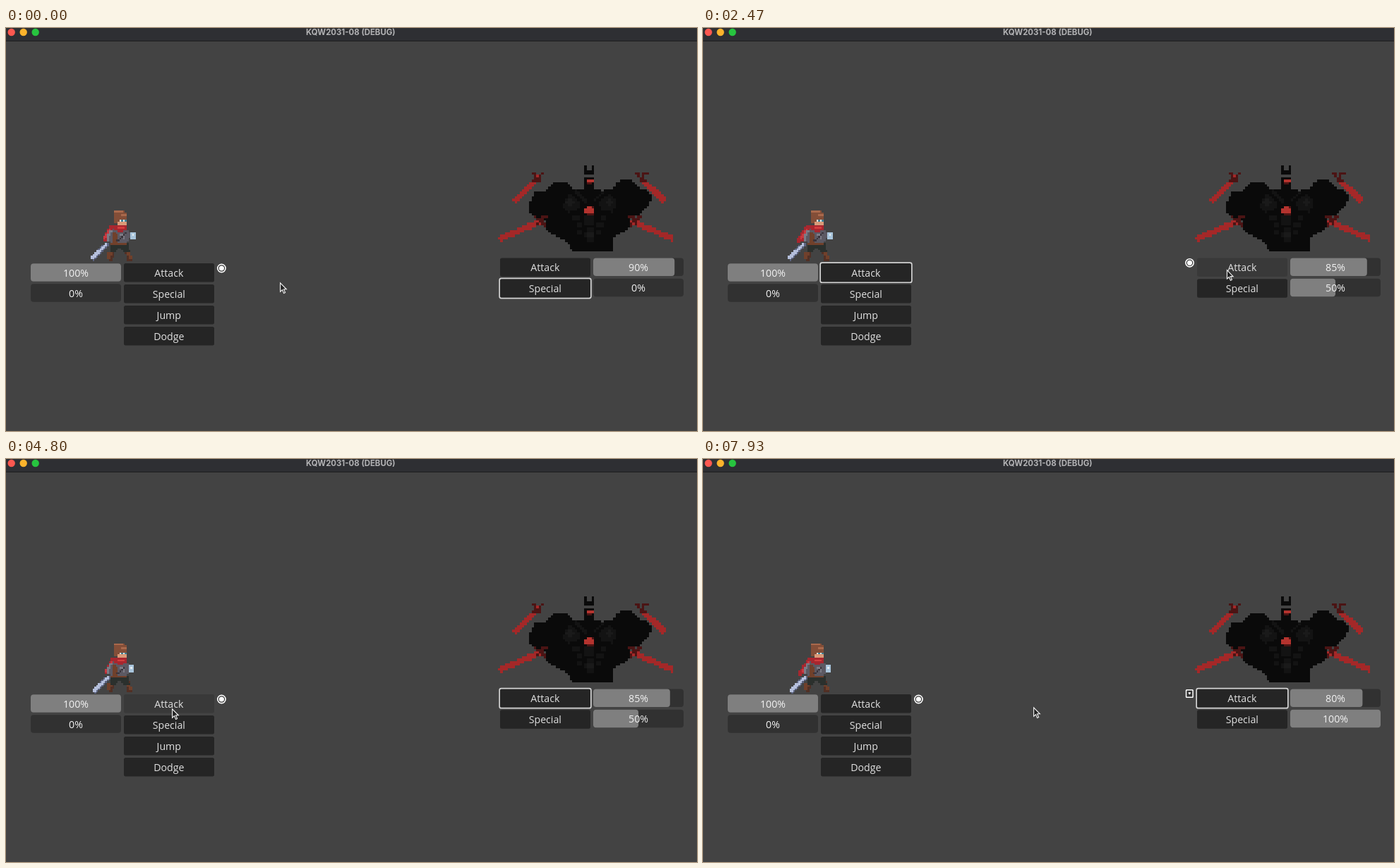
An HTML page with a canvas that plays this animation: 979 px wide and 572 px high, repeating every 8000 ms.

```html
<!DOCTYPE html>
<html lang="en">
<head>
<meta charset="utf-8">
<title>Battle prototype</title>
<style>
  html, body { margin: 0; width: 100%; height: 100%; overflow: hidden; background: #434343; }
  canvas { display: block; }
</style>
</head>
<body>
<canvas id="stage" width="979" height="572"></canvas>
<script>
const ctx = document.getElementById('stage').getContext('2d');
const LOOP = 8000;

// ---------- pixel sprites: vector shapes sampled on a coarse grid ----------
// shape: [colour, path, stroke width (0 = filled)]
function makeSprite(cell, x, y, cols, rows, shapes) {
  const image = document.createElement('canvas');
  image.width = cols;
  image.height = rows;
  const g = image.getContext('2d');
  for (const [colour, path, width] of shapes) {
    g.fillStyle = colour;
    g.lineWidth = width || 1;
    for (let r = 0; r < rows; r++) for (let c = 0; c < cols; c++) {
      const px = x + (c + .5) * cell, py = y + (r + .5) * cell;
      if (width ? g.isPointInStroke(path, px, py) : g.isPointInPath(path, px, py)) g.fillRect(c, r, 1, 1);
    }
  }
  return () => ctx.drawImage(image, x, y, cols * cell, rows * cell);
}

function moved(d, matrix) {
  const path = new Path2D();
  path.addPath(new Path2D(d), new DOMMatrix(matrix));
  return path;
}

const plain = (colour, d, width) => [colour, new Path2D(d), width];
const mirrored = (axis, colour, d, width) =>
  [plain(colour, d, width), [colour, moved(d, [-1, 0, 0, 1, 2 * axis, 0]), width]];

const RED = '#a42828', DARK_RED = '#4b1414', BLACK = '#0a0a0a', COAL = '#131313';

const drawEnemy = makeSprite(3.4, 697, 194.8, 75, 37, [
  plain(BLACK, 'M820 229H809L803 230L800 222L795 219H778L770 225L763 232L748 233L745 243L741 250V262L748 267L765 272V284L770 291L783 297L796 303L799 311L805 318H861V297L868 292L877 289L883 281L885 270L900 263L911 250L915 240L910 231L900 229L892 220L885 215H872L864 220L861 228L845 231L834 229V211H819Z'),
  plain(BLACK, 'M820 194H823.6V201H830V194H834V207.5H820Z'),
  ...mirrored(827, COAL, 'M791 244L799 235L813 246L812 257L796 262L790 254Z'),
  ...mirrored(827, '#1a1a1a', 'M793 247L799 242L805 248L798 253Z'),
  ...mirrored(827, COAL, 'M806 231L822 247', 4),
  ...mirrored(827, COAL, 'M804 266H812V273H804ZM808 276H816V283H808ZM810 287H816V294H810Z'),
  plain(COAL, 'M820 266H834V280H820ZM823 284L831 284L834 292L831 304H823L820 292Z'),
  plain('#1a1a1a', 'M822 289H832V298H822Z'),
  plain(DARK_RED, 'M823 214H831V221H823ZM822 252H832V266H822Z'),
  plain('#b4332e', 'M822 215H832V219H822ZM820 256H834V263H820ZM823 253H830V258H823Z'),
  ...mirrored(827, RED, 'M720 246L756 212', 8),
  ...mirrored(827, DARK_RED, 'M744 208H750V213L757 219M761 206L751 217L745 216', 3.5),
  ...mirrored(822, RED, 'M698 300L758 274', 8),
  ...mirrored(824, DARK_RED, 'M748 268L756 271L764 282M768 268H760L754 279', 3.5),
]);

const STEEL = '#b5bfdc', LEATHER = '#70402b', CLOTH = '#5c5963', SCARF = '#a8272f';

// The fourth entry moves a part sideways as the body sinks; feet have none.
function makeHero(sunk, wideCape) {
  const cape = wideCape ? 'M153 280L145 281L139 291L132 302L133 306L142 302L151 290Z'
                        : 'M153 280L146 281L141 290L138 302L142 303L151 290Z';
  const parts = [
    ['#513025', 'M148 314L145 331H151L154 316ZM168 314L172 331H179L176 316Z'],
    [LEATHER, 'M143 319H150L148 328H143ZM171 319H176L179 329H174Z'],
    ['#5d6480', 'M121 328L145 305', 6, 1],
    [STEEL, 'M121 327L143 306', 4, 1],
    [SCARF, cape, 0, 1],
    ['#c83a40', 'M147 284L139 299', 2.6, 1],
    ['#2b302d', 'M148 304H172L175 317H167L161 313L154 318H147Z', 0, 0],
    [CLOTH, 'M150 286L171 286L177 293L172 304H149L145 300Z', 0, 0],
    ['#7c7b86', 'M148 288L143 301M163 293L168 300', 3, 0],
    [LEATHER, 'M151 288L157 293L158 304H150ZM148 304H172V307H148Z', 0, 0],
    ['#3a343b', 'M157 303L170 291', 2.6, 0],
    [CLOTH, 'M170 287L181 291L178 298L170 296Z', 0, -1],
    ['#a9c5dc', 'M177 291H185V300H177Z', 0, -1],
    ['#e5edf2', 'M178 292H182V295H178Z', 0, -1],
    ['#d99a78', 'M157 269H171V281H160Z', 0, 0],
    ['#834e38', 'M152 264L155 259H168L172 264V271H161L159 277H155L152 272Z', 0, 0],
    ['#a9694c', 'M154 260H165V263H154ZM163 265H170V268H163Z', 0, 0],
    ['#e3e6e2', 'M161 272H170V275H161Z', 0, 0],
    ['#3f8296', 'M163 272H166V275H163ZM168 272H171V275H168Z', 0, 0],
    [SCARF, 'M154 279H161L171 281L172 286L162 291L153 286Z', 0, 0],
    ['#d33d3d', 'M158 281H168V284H158Z', 0, 0],
  ];
  const shapes = parts.map(([colour, d, width, sway]) => {
    const fixed = sway === undefined;
    return [colour, moved(d, [1, 0, 0, 1, fixed ? 0 : sway * sunk, fixed ? 0 : sunk]), width];
  });
  return makeSprite(2.55, 120, 259.3, 27, 29, shapes);
}
const heroPoses = [makeHero(0, false), makeHero(0, true), makeHero(2.55, false), makeHero(2.55, true)];

// ---------- timeline ----------
const HOLD = 85, SPEED = 1.2, HIT_DELAY = 515;
const clicks = [
  { at: 930, side: 'hero' },
  { at: 3210, side: 'enemy' },
  { at: 5090, side: 'hero' },
  { at: 6115, side: 'enemy' },
];
const pointerKeys = [
  [0, 388, 361], [60, 388, 361], [820, 248, 342], [1120, 248, 342], [1680, 500, 374],
  [2350, 742, 343], [3000, 740, 341], [3680, 740, 341], [4450, 237, 346], [4800, 235, 354],
  [5200, 236, 353], [5950, 733, 342], [6900, 733, 342], [7750, 468, 351], [7930, 468, 352], [LOOP, 468, 352],
];

function pointerAt(t) {
  const i = pointerKeys.findIndex(key => key[0] > t);
  const [t0, x0, y0] = pointerKeys[i - 1], [t1, x1, y1] = pointerKeys[i];
  const u = (t - t0) / (t1 - t0), e = u * u * (3 - 2 * u);
  return { x: x0 + (x1 - x0) * e, y: y0 + (y1 - y0) * e };
}

// ---------- drawing ----------
function box(x, y, w, h, colour, radius = 2.5) {
  ctx.fillStyle = colour;
  ctx.beginPath();
  ctx.roundRect(x, y, w, h, radius);
  ctx.fill();
}

function disc(x, y, r, colour) {
  ctx.fillStyle = colour;
  ctx.beginPath();
  ctx.arc(x, y, r, 0, 7);
  ctx.fill();
}

function label(text, x, y, colour = '#e0e0e0', font = '500 14.2px "Open Sans", sans-serif') {
  ctx.font = font;
  ctx.textAlign = 'center';
  ctx.fillStyle = colour;
  ctx.fillText(text, x, y);
}

function button(text, x, y, pointer, focused, pressed) {
  const hover = pointer.x >= x && pointer.x < x + 128 && pointer.y >= y && pointer.y < y + 26.4;
  box(x, y, 128, 26.4, pressed ? '#191919' : hover ? '#393939' : '#252525');
  if (focused) {
    ctx.strokeStyle = '#d2d2d2';
    ctx.lineWidth = 1.7;
    ctx.beginPath();
    ctx.roundRect(x - .85, y - .85, 129.7, 28.1, 2.5);
    ctx.stroke();
  }
  label(text, x + 63.8, y + 18.6, pressed ? '#fff' : '#e0e0e0');
}

function bar(x, y, percent) {
  box(x, y, 128, 25.5, '#313131', 4);
  if (percent) box(x, y, 1.28 * percent, 25.5, '#7f7f7f', 4);
  label(percent + '%', x + 64, y + 18.4, '#f2f2f2');
}

function turnMark(x, y) {
  disc(x, y, 6.4, '#fff');
  disc(x, y, 4.8, '#333');
  disc(x, y, 3.6, '#fff');
}

function chargeMark(x, y) {
  box(x - 5.5, y - 6, 11, 12, '#fff', 1.5);
  box(x - 4, y - 4.4, 8, 8.8, '#333', .5);
  ctx.fillStyle = '#fff';
  ctx.fill(new Path2D(`M${x - 1.5} ${y - 2}h3v1.8l-1.5 1.8l-1.5 -1.8z`));
}

function drawPointer({ x, y }) {
  const arrow = moved('M.6 .8V13.2L3.5 10.6L5.6 15.4L7.6 14.5L5.5 9.8H9.3Z', [1, 0, 0, 1, x, y]);
  ctx.fillStyle = '#222';
  ctx.strokeStyle = '#f4f4f4';
  ctx.lineWidth = 1.1;
  ctx.fill(arrow);
  ctx.stroke(arrow);
}

function drawWindow() {
  ctx.fillStyle = '#434343';
  ctx.fillRect(0, 0, 979, 572);
  ctx.fillStyle = '#2e2f33';
  ctx.fillRect(0, 0, 979, 18);
  ctx.fillStyle = '#1c1c1d';
  ctx.fillRect(0, 18, 979, 1);
  ['#fe5850', '#fcb32c', '#27c43f'].forEach((colour, i) => disc(7.7 + 17 * i, 6, 5.2, colour));
  label('KQW2031-08 (DEBUG)', 488.3, 9.9, '#b3b3b5', '700 11.4px Inter, sans-serif');
}

function drawShot({ at, side }, t) {
  const age = t - at - HOLD, hero = side === 'hero';
  if (age < 0 || (hero && age > HIT_DELAY)) return;
  const x = hero ? 160 + age * SPEED : 826 - age * SPEED;
  box(x - 13.5, (hero ? 295 : 256) - 13.5, 27, 27, '#437fb0', 3);
}

function render(t) {
  const pointer = pointerAt(t);
  const last = clicks.filter(click => click.at <= t).pop();
  const turns = clicks.filter(click => click.at + HOLD <= t).length;
  const hits = clicks.filter(click => click.side === 'hero' && click.at + HOLD + HIT_DELAY <= t).length;
  const isFocused = side => !!last && last.side === side;
  const isPressed = side => isFocused(side) && t < last.at + HOLD;
  const enemyTurn = turns % 2 === 1;

  drawWindow();
  ctx.imageSmoothingEnabled = false;
  drawEnemy();
  heroPoses[Math.floor((t + 75) % 740 / 185)]();

  bar(35, 334.3, 100);
  bar(35, 363.2, 0);
  ['Attack', 'Special', 'Jump', 'Dodge'].forEach((text, i) =>
    button(text, 167, 334 + 30 * i, pointer, !i && isFocused('hero'), !i && isPressed('hero')));

  button('Attack', 700, 326.4, pointer, isFocused('enemy'), isPressed('enemy'));
  button('Special', 700, 356.3, pointer, !last, false);
  bar(832, 326.5, 90 - 5 * hits);
  bar(832, 355.7, 50 * hits);

  if (enemyTurn) turnMark(689.5, 333.3);
  else turnMark(305.4, 341);
  if (hits === 2) chargeMark(689.3, enemyTurn ? 350 : 333);

  clicks.forEach(click => drawShot(click, t));
  drawPointer(pointer);
}

const start = performance.now();
function tick() {
  render((performance.now() - start) % LOOP);
  requestAnimationFrame(tick);
}
tick();
</script>
</body>
</html>
```
